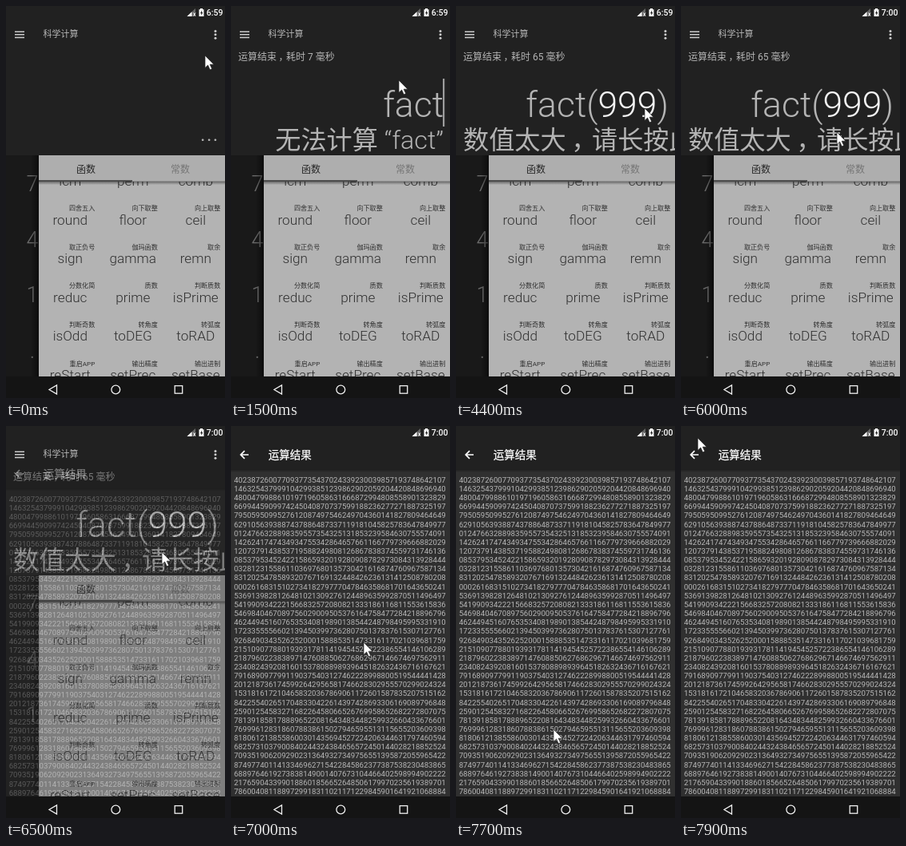
An HTML page that plays this animation: 274 px wide and 491 px high, repeating every 8000 ms.

```html
<!DOCTYPE html>
<html lang="zh-CN">
<head>
<meta charset="utf-8">
<title>科学计算</title>
<style>
html, body { margin: 0; width: 100%; height: 100%; overflow: hidden; background: #212121; }
svg { display: block; }
text { font-family: Roboto, "Noto Sans CJK SC", "Noto Sans CJK", sans-serif; white-space: pre; }
.light { font-weight: 300; }
.end { text-anchor: end; }
.mid { text-anchor: middle; }
.input { font-size: 44.5px; font-weight: 300; fill: #b4b4b4; }
.num { fill: #f4f4f4; }
.result { font-size: 32.2px; font-weight: 300; fill: #b4b4b4; }
.info { font-size: 12px; fill: #b4b4b4; }
.digits { font-size: 9.65px; fill: #b8b8b8; }
.icon { fill: none; stroke: #f0f0f0; stroke-width: 1.3; }

#states, #caret, #page, #scroll, #old, #new, #mouse { animation: 8s step-end infinite; }
#states { animation-name: states; }
#caret { animation-name: caret; }
#page { animation-name: page; }
#scroll { animation-name: scroll; }
#old { animation-name: old; }
#new { animation-name: new; }
#mouse { animation-name: mouse; }

@keyframes states {
  0% { transform: translateY(0); }
  7.5% { transform: translateY(-200px); }
  13.75% { transform: translateY(-400px); }
  16.25% { transform: translateY(-600px); }
  17.5% { transform: translateY(-800px); }
  18.75% { transform: translateY(-1000px); }
  23.75% { transform: translateY(-1200px); }
  25% { transform: translateY(-1400px); }
  26.25% { transform: translateY(-1600px); }
  27.5% { transform: translateY(-1800px); }
  38.75% { transform: translateY(-2000px); }
  40% { transform: translateY(-2200px); }
  41.25% { transform: translateY(-2400px); }
  46.25% { transform: translateY(-2600px); }
  47.5%, 100% { transform: translateY(-2800px); }
}
@keyframes caret {
  0% { opacity: 0; transform: translateX(265.3px); }
  5% { opacity: 1; transform: translateX(265.3px); }
  32.5% { opacity: 0; transform: translateX(251.3px); }
  33.75% { opacity: 1; transform: translateX(251.3px); }
  52.5% { opacity: 0; transform: translateX(251.3px); }
  58.75% { opacity: 1; transform: translateX(251.3px); }
  63.75%, 100% { opacity: 0; transform: translateX(251.3px); }
}
@keyframes page {
  0% { opacity: 0; transform: none; }
  81.25% { opacity: .4; transform: translateY(24px); }
  82.5% { opacity: .85; transform: translateY(7px); }
  83.75%, 100% { opacity: 1; transform: none; }
}
@keyframes scroll {
  0% { transform: none; }
  91.25% { transform: translateY(-120px); }
  92.5% { transform: translateY(-194px); }
  95% { transform: translateY(-110px); }
  96.25%, 100% { transform: none; }
}
@keyframes old { 0% { opacity: 1; } 75%, 100% { opacity: 0; } }
@keyframes new { 0% { opacity: 0; } 75%, 100% { opacity: 1; } }
@keyframes mouse {
  0% { transform: translate(249px, 62px); }
  1.25% { transform: translate(229px, 78px); }
  2.5% { transform: translate(210px, 93px); }
  55% { transform: translate(236px, 128px); }
  56.25% { transform: translate(196px, 156px); }
  58.75% { transform: translate(195px, 158px); }
  85% { transform: translate(190px, 190px); }
  86.25% { transform: translate(180px, 232px); }
  87.5% { transform: translate(166px, 271px); }
  88.75% { transform: translate(150px, 380px); }
  90% { transform: translate(142px, 461px); }
  91.25% { transform: translate(136px, 330px); }
  92.5% { transform: translate(131px, 200px); }
  93.75% { transform: translate(130px, 176px); }
  95% { transform: translate(129px, 262px); }
  96.25% { transform: translate(122px, 380px); }
  97.5% { transform: translate(70px, 190px); }
  98.75%, 100% { transform: translate(21px, 15px); }
}
</style>
</head>
<body>
<svg width="274" height="491" viewBox="0 0 274 491">
  <defs>
    <linearGradient id="down" x2="0" y2="1">
      <stop stop-color="#000" stop-opacity=".4"/><stop offset="1" stop-color="#000" stop-opacity="0"/>
    </linearGradient>
    <linearGradient id="left">
      <stop stop-color="#000" stop-opacity="0"/><stop offset="1" stop-color="#000" stop-opacity=".5"/>
    </linearGradient>
  </defs>

  <rect width="274" height="491" fill="#212121"/>
  <path d="M11 32.2h12M11 35.8h12M11 39.4h12" stroke="#ccc" stroke-width="1.5"/>
  <text x="46.5" y="39.3" font-size="11" fill="#b8b8b8">科学计算</text>
  <g fill="#ccc"><circle cx="262" cy="31.4" r="1.5"/><circle cx="262" cy="35.8" r="1.5"/><circle cx="262" cy="40.2" r="1.5"/></g>

  <svg y="50" width="274" height="137"><g id="states"></g></svg>
  <rect id="caret" y="91" width="1.5" height="60" fill="#d8d8d8"/>

  <rect y="187" width="274" height="277" fill="#191919"/>
  <g id="pad" class="light mid" font-size="27" fill="#6a6a6a"></g>
  <rect x="31" y="187" width="10" height="277" fill="url(#left)"/>

  <rect x="41" y="187" width="233" height="277" fill="#b3b3b3"/>
  <svg y="219" width="274" height="245"><g id="grid" transform="translate(0 -219)" fill="#303030"></g></svg>
  <rect x="41" y="187" width="233" height="32" fill="#aeaeae"/>
  <rect x="41" y="220" width="233" height="4" fill="url(#down)"/>
  <path d="M41 219.5h233" stroke="#8c8c8c"/>
  <path d="M41 219h117" stroke="#333" stroke-width="1.6"/>
  <g class="mid" font-size="12">
    <text x="100" y="208.6" fill="#262626">函数</text>
    <text x="218" y="208.6" fill="#757575">常数</text>
  </g>

  <g id="page">
    <rect y="18" width="274" height="446" fill="#303030"/>
    <svg y="54" width="274" height="410"><g id="scroll" class="digits"></g></svg>
    <rect y="18" width="274" height="36" fill="#212121"/>
    <rect y="54" width="274" height="4" fill="url(#down)"/>
    <path d="M22 36H12.5M17 31.2L12.2 36l4.8 4.8" fill="none" stroke="#fff" stroke-width="1.7"/>
    <text x="46.8" y="40.8" font-size="13.5" font-weight="500" fill="#fff" stroke="#fff" stroke-width=".25">运算结果</text>
  </g>

  <rect y="464" width="274" height="27" fill="#141414"/>
  <g class="icon" transform="translate(0 .5)">
    <path d="M63.5 474.5v11l-9.5-5.5z"/>
    <circle cx="137.3" cy="480" r="5.4"/>
    <rect x="211.2" y="475.2" width="9.5" height="9.5"/>
  </g>

  <path d="M226.5 13H237V3z" fill="#666"/>
  <path d="M226.5 13h6V7.3z" fill="#fff"/>
  <path d="M234.5 8.5l2.5 4m0-4l-2.5 4" stroke="#fff"/>
  <path d="M241.5 4.2h1.5V3h3v1.2h1.5V13h-6z" fill="#fff"/>
  <path d="M245 5.5l-2 3.7h1.3v2.5l2-3.7H245z" fill="#222"/>
  <g class="end" font-size="10.5" font-weight="500" fill="#fff">
    <text id="old" x="271.5" y="12.4">6:59</text>
    <text id="new" x="271.5" y="12.4">7:00</text>
  </g>

  <path id="mouse" d="M0 0v15.5l3.6-3.4 2.6 5.7 2.5-1.1-2.5-5.5h4.8z" fill="#fff" stroke="#222" stroke-width=".7"/>
</svg>
<script>
const $ = id => document.getElementById(id);
const text = (x, y, s, attrs = '') => `<text x="${x}" y="${y}" ${attrs}>${s}</text>`;

function fact(n) {
  let r = 1n;
  for (let i = 2n; i <= n; i++) r *= i;
  return String(r);
}

// Calculator display: [input, result, milliseconds]; no time means still working
const bad = s => `无法计算 “${s}”`;
const states = [
  ['', '···', ''],
  ['f', bad('f'), 9],
  ['fa', bad('fa'), 8],
  ['fac', bad('fac'), 8],
  ['fact', '···'],
  ['fact', bad('fact'), 7],
  ['fact(', '···'],
  ['fact(', bad('fact('), 8],
  ['fact()', '···'],
  ['fact()', '函数缺少必要的参数', 9],
  ['fact(9)', '362880', 18],
  ['fact(99)', '···'],
  ['fact(99)', fact(99n).slice(0, 20), 21],
  ['fact(999)', '···'],
  ['fact(999)', '数值太大，请长按此处', 65],
];
// Sets the full-width comma nearer the middle of its cell
const comma = s => s.replace(/，(.)/, '<tspan dx=".2em">，</tspan><tspan dx="-.2em">$1</tspan>');

$('states').innerHTML = states.map(([input, result, ms], i) => {
  const info = ms === '' ? '' : ms ? `运算结束，耗时 ${ms} 毫秒` : '运算中';
  const wide = /^(函数|数值|\d{9})/.test(result);
  const colored = input.replace(/\d+/, '<tspan class="num">$&</tspan>');
  return `<g transform="translate(0 ${i * 200 - 50})">`
    + text(9, 67.6, comma(info), 'class="info"')
    + text(266, 139, colored, 'class="input end"')
    + text(wide ? 9 : 266, 178.6, comma(result), `class="result ${wide ? '' : 'end'}"`)
    + '</g>';
}).join('');

$('pad').innerHTML = ['7', '4', '1', '.'].map((s, i) => text(33, 232.2 + i * 69.5, s)).join('');

// Function list, three per row: label and name
const rows = [
  ',lcm,,perm,,comb',
  '四舍五入,round,向下取整,floor,向上取整,ceil',
  '取正负号,sign,伽玛函数,gamma,取余,remn',
  '分数化简,reduc,质数,prime,判断质数,isPrime',
  '判断奇数,isOdd,转角度,toDEG,转弧度,toRAD',
  '重启APP,reStart,输出精度,setPrec,输出进制,setBase',
];
$('grid').innerHTML = rows.map((row, r) => {
  const cells = row.split(',');
  const y = 225 + r * 48.6;
  return [0, 1, 2].map(c => {
    const x = 80.3 + c * 78.5;
    return text(x + 31, y - 17.4, cells[c * 2], 'class="end" font-size="8.1"')
      + text(x, y, cells[c * 2 + 1], 'class="light mid" font-size="17.2"');
  }).join('');
}).join('');

$('scroll').innerHTML = fact(999n).match(/.{1,49}/g)
  .map((s, i) => text(3.7, 16.8 + i * 11.15, s)).join('');
</script>
</body>
</html>
```
